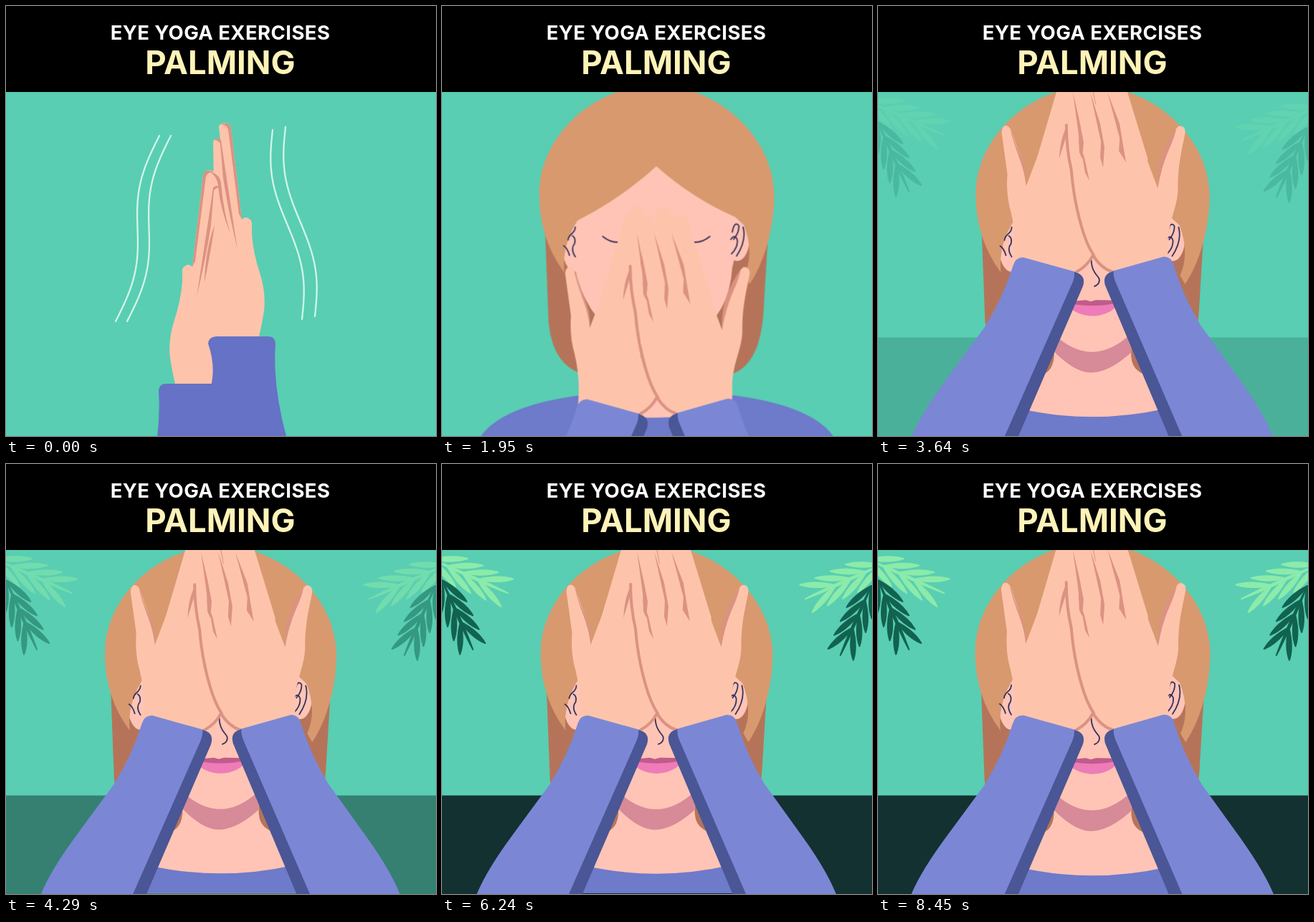
These frames come from a looping animation (600 px wide and 600 px high, 8580 ms). An HTML page:

```html
<!DOCTYPE html>
<html lang="en">
<head>
<meta charset="utf-8">
<title>Palming</title>
<style>
html, body { margin: 0; width: 100%; height: 100%; overflow: hidden; background: #59ceb2; }
svg { display: block; width: 100vw; height: 100vh; }
text { font-family: Inter, Roboto, sans-serif; font-weight: 700; text-anchor: middle; }
.skin { fill: #fec4ab; }
.shade { fill: #db9283; }
.crease { fill: none; stroke: #db9283; stroke-width: 4; stroke-linecap: round; }
.ink { fill: none; stroke: #35325a; stroke-width: 1.8; stroke-linecap: round; }
.finger { fill: none; stroke: #fec4ab; stroke-width: 24; stroke-linecap: round; }
#waves { fill: none; stroke: #d3f5ea; stroke-width: 2.3; stroke-linecap: round; }
#fronds { stroke-width: 2; stroke-linejoin: round; }
</style>
</head>
<body>
<svg viewBox="0 0 600 600">
  <defs>
    <g id="hand">
      <path class="skin" d="M289 191Q289 185 295 185L299 187 297 169Q298 163 305 163 312 163 314 171L329 298Q333 293 338 296 344 299 343 306V318Q345 345 354 372 363 400 360 425 358 440 352 466H294Z"/>
      <path class="shade" d="M299 165Q313 160 314 171L329 298 325 290 310 172Q308 166 299 165ZM290 187Q294 183 300 187L304 215 323 340Q310 285 303 240L299 192Q296 187 290 187Z"/>
    </g>
    <path id="cuff" fill="#6672c5" d="M282 471Q283 461 294 461H365Q376 461 376 472 372 530 391 600L410 700H270L287 526Q292 500 282 471Z"/>
    <g id="sleeve">
      <path fill="#7b87d5" d="M189 362Q193 350 204 351L276 371 280 388 178 600 160 645H25L48 600Q62 566 100 515L150 447Q176 405 189 362Z"/>
      <path fill="#4a5695" d="M274 371Q291 375 286 391L196 600 178 645H157L177 600 271 387Q275 378 274 371Z"/>
    </g>
    <g id="fronds"></g>
  </defs>

  <rect width="600" height="600" fill="#59ceb2"/>

  <g id="rub">
    <g id="waves"><path/><path/></g>
    <g id="rightHand"><use href="#hand"/></g>
    <g id="leftHand">
      <use href="#hand" transform="matrix(-1 0 0 1 589 66)"/>
      <path class="shade" d="M284 231Q298 234 300 247 303 284 313 318 298 280 296 250 294 237 284 231ZM291 306Q288 330 277 386 278 340 291 306Z"/>
      <use href="#cuff" transform="matrix(-1 0 0 1 589 66)"/>
    </g>
    <use id="rightCuff" href="#cuff"/>
  </g>

  <g id="palm">
    <g id="room">
      <rect y="462.5" width="600" height="138" fill="#143131"/>
      <use href="#fronds"/>
      <use href="#fronds" transform="matrix(-1 0 0 1 599 8)"/>
    </g>
    <g id="body">
      <path fill="#b5745a" d="M144 280L150 440Q157 515 220 515H385Q440 515 447 430L456 280Z"/>
      <path fill="#ffc4b5" d="M246 430V488Q244 514 222 515L196 565 190 600H410L403 565 382 516Q354 512 353 488V430Z"/>
      <path fill="#d78a98" d="M246 450V482Q275 511 297 511 322 511 353 483V450Z"/>
      <path fill="#6e7aca" d="M55 600Q85 555 198 541V561Q299 584 401 561V541Q515 555 545 600Z"/>
      <path fill="#ffc4b5" d="M185 250L299 200 413 250V330L404 365Q400 430 354 456 299 508 245 457 200 432 185 360Z"/>
      <g fill="#ffc4b5"><ellipse cx="187" cy="335" rx="18" ry="36"/><ellipse cx="411" cy="324" rx="17" ry="32"/></g>
      <path fill="#d8996f" d="M137 264C137 184 212 113 299 113S462 187 462 265C462 315 446 362 428 388L421 376Q435 345 420 306L408 295Q350 270 299 225 250 270 190 300 168 335 172 372 137 325 137 264Z"/>
      <path class="ink" d="M187 309C187 319 178 317 177 327M183 321Q188 324 186 332M171 335Q176 338 179 348M186 332Q180 339 187 350M404 316Q407 300 413 307 414 316 406 326M402 326Q408 318 411 327 412 337 403 346M419 309Q424 328 410 349"/>
      <path class="ink" d="M225 322Q245 338 265 322M333 322Q353 338 373 322"/>
      <path class="ink" d="M298 344C296 362 300 370 307 378 311 383 308 389 302 391"/>
      <path fill="#ee7cb8" d="M261 412C275 418 325 418 338 411 325 438 277 440 261 412Z"/>
      <path fill="#c05b8b" d="M261 412Q282 411 290 410L297 412 304 410Q318 410 338 411C325 420 277 420 261 412Z"/>
      <g id="arms">
        <path class="finger" d="M267 103L234 215M272 95L258 210"/>
        <path class="skin" d="M173 177Q174 166 181 168 187 171 190 185C196 205 208 225 207 252L249 142 285 140 302 345Q292 364 276 378L190 366Q195 325 186 288 179 265 181 235Z"/>
        <path class="shade" d="M185 172Q188 176 190 187C196 207 210 225 207 252 204 220 193 208 185 172ZM266 157L262 185 253 214Q254 190 261 174Z"/>
        <path class="finger" d="M285 108L306 215M309 98L330 215M331 107L364 215"/>
        <path class="skin" d="M261 168Q263 158 268 157L274 140 345 135 390 255Q390 220 405 195 412 172 420 168 429 168 428 178C424 200 418 220 418 255 418 280 405 300 404 330V365L328 376Q310 366 300 347C280 300 272 270 269 230Z"/>
        <path class="shade" d="M272 121L281 160 287 191 285 214 281 205 280 180ZM279 188L288 212 295 244 289 233 285 210ZM296 121L310 165 316 198 314 226 310 212 311 190ZM320 121L337 165 341 190 346 219 336 203 337 185ZM416 171Q403 188 395 212 389 230 390 255 395 225 406 200 413 185 416 171Z"/>
        <path class="crease" d="M263 167Q263 200 270 230 273 270 284 308 291 333 301 348"/>
        <path class="crease" stroke-width="3" d="M277 371Q292 363 300 348 311 366 327 371"/>
        <use href="#sleeve"/>
        <use href="#sleeve" transform="matrix(-.979 0 0 1 597 -1)"/>
      </g>
    </g>
  </g>

  <rect width="600" height="120"/>
  <text x="299" y="47" font-size="27.5" letter-spacing=".4" fill="#fff">EYE YOGA EXERCISES</text>
  <text x="299" y="94.5" font-size="45.5" fill="#fff3b8">PALMING</text>
</svg>
<script>
const $ = id => document.getElementById(id);
const clamp = v => Math.max(0, Math.min(1, v));
const STEP = 130, LOOP = 8580;

// A slim lens from its root, pointing along an angle in degrees.
function blade(x, y, angle, len, width) {
  return `<path d="M0 0Q${len * 0.6} ${width} ${len} 0Q${len * 0.6} ${-width} 0 0Z"
    transform="translate(${x} ${y}) rotate(${angle})"/>`;
}
// Pairs of blades spread along a stem that ends in a blade of its own.
function frond(x, y, angle, len, color) {
  const a = angle * Math.PI / 180;
  let parts = blade(x, y, angle, len, 3);
  for (let u = 0; u < 0.7; u += 0.2) {
    const px = x + u * len * Math.cos(a), py = y + u * len * Math.sin(a);
    for (const side of [-1, 1]) parts += blade(px, py, angle + side * 25, len * 0.43, 6.5);
  }
  return `<g fill="${color}" stroke="${color}">${parts}</g>`;
}
$('fronds').innerHTML = frond(0, 162, 66, 106, '#12624f') + frond(-14, 133, 24, 116, '#8cebaa');

// A pair of slanted sine lines; k swings the bend from one side to the other.
function wave(k, mirror) {
  const line = (dx, dy) => 'M' + Array.from({ length: 33 }, (_, i) => {
    const u = i / 32;
    const x = 214 - 4 * k + u * (20 * k - 61) + 11 * (2 * k - 1) * Math.sin(2 * Math.PI * u) + dx;
    const y = 181 - 12 * k + u * (259 + 5 * k) + dy;
    return [mirror ? 600 - x : x, y];
  }).join('L');
  return line(0, 0) + line(16 + 2 * k, 4 * k);
}

function drawRub(n) {
  const phase = (n > 10 ? 12 : n) - 0.5, edge = Math.cos(Math.PI / 10);
  const k = (1 - Math.cos(Math.PI * phase / 5) / edge) / 2;
  const [left, right] = $('waves').children;
  left.setAttribute('d', wave(k, false));
  right.setAttribute('d', wave(1 - k, true));
  const down = `translate(0 ${66 * k})`;
  $('rightHand').setAttribute('transform', down);
  $('rightCuff').setAttribute('transform', down);
  $('leftHand').setAttribute('transform', `translate(0 ${-66 * k})`);
}

function drawPalm(t) {
  const breath = 1 + 0.013 * Math.cos(2 * Math.PI * (t - 2600) / 5200);
  $('body').setAttribute('transform', `translate(299 372) scale(${breath}) translate(-299 -372)`);
  // Arms rise past the face, then settle back.
  const rise = clamp((t - 1690) / 910), settle = clamp((t - 2600) / 700);
  const y = t < 2600 ? 352 * (1 - rise) ** 1.42 - 22 : -11 * (1 + Math.cos(Math.PI * settle));
  $('arms').setAttribute('transform', `translate(0 ${y})`);
  $('room').setAttribute('opacity', clamp((t - 3380) / 2260) ** 0.77);
}

function frame(now) {
  const n = Math.floor(now % LOOP / STEP);
  const rubbing = n < 13;
  $('rub').style.display = rubbing ? '' : 'none';
  $('palm').style.display = rubbing ? 'none' : '';
  if (rubbing) drawRub(n); else drawPalm(n * STEP);
}
const start = performance.now();
function tick() {
  frame(performance.now() - start);
  requestAnimationFrame(tick);
}
tick();
</script>
</body>
</html>
```
